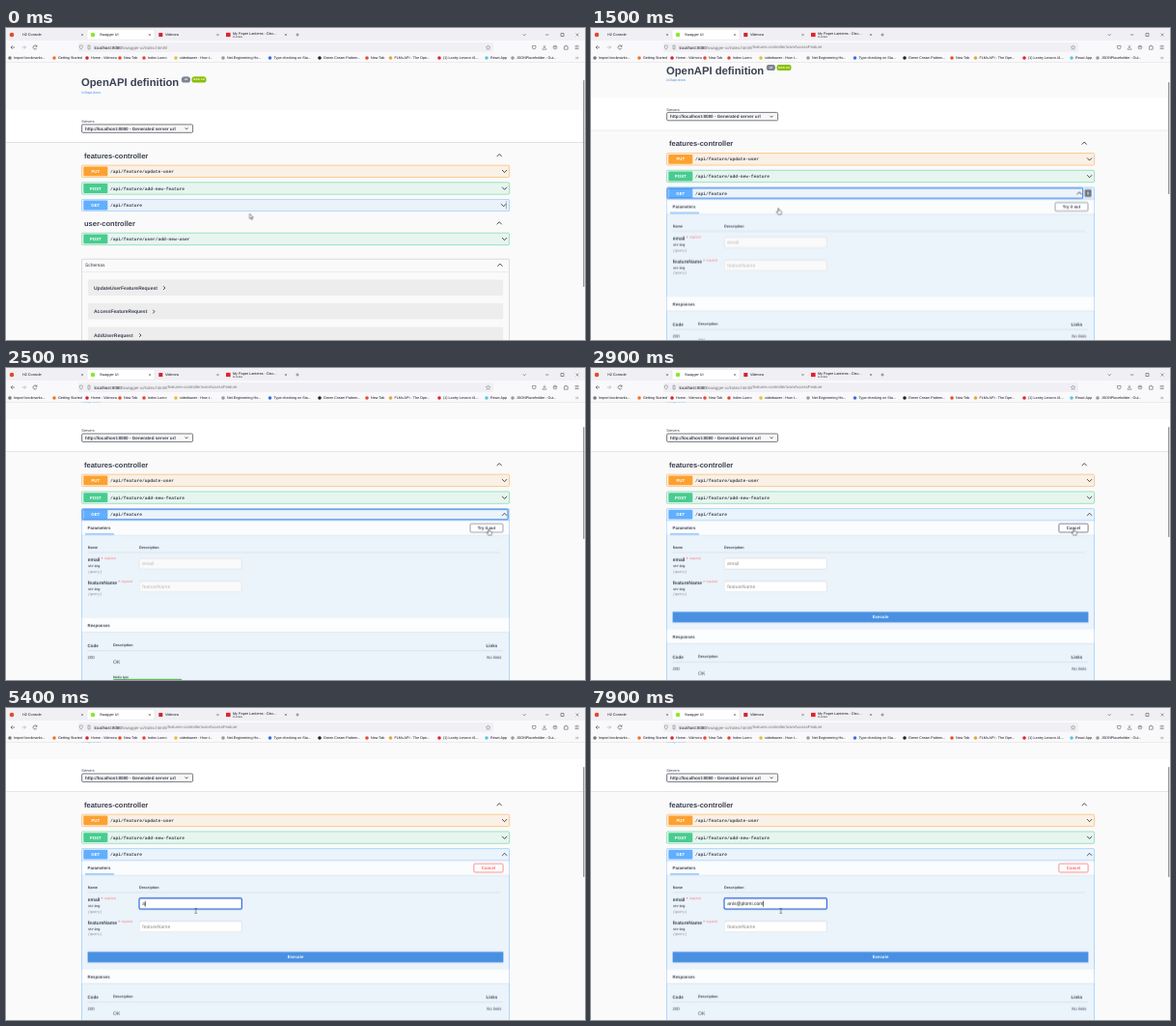
An HTML page for the animation above (8000 ms loop, 600 by 323 pixels).

```html
<!DOCTYPE html>
<html lang="en">
<head>
<meta charset="utf-8">
<title>Swagger UI</title>
<style>
html, body { margin: 0; width: 100%; height: 100%; overflow: hidden; background: #fafafa; }
svg { display: block; width: 600px; height: 323px; }
text { font-family: "Liberation Sans", Arial, sans-serif; fill: #3b4151; text-rendering: geometricPrecision; white-space: pre; }
.b { font-weight: 700; }
.i { font-style: italic; }
.m { font-family: "Liberation Mono", monospace; }
.mid { text-anchor: middle; }
.ui text { fill: #15141a; }

/* One 8 s clock for everything; on/off states switch in steps. */
.a { animation: 8s linear infinite both; }
.s { animation: 8s step-end infinite both; }
.page { animation-name: scroll; }
.thumb { animation-name: thumb; }
.url { animation-name: url; }
.open { animation-name: open; }
.shut { animation-name: shut; }
.edit { animation-name: edit; }
.view { animation-name: view; }
.drop { animation-name: drop; }
.ring { animation-name: ring; }
.ringbox { animation-name: ringbox; }
.slide { animation-name: slide; }
.copy { animation-name: copy; }
.focus { animation-name: focus; }
.blur { animation-name: blur; }
.cancel { animation-name: cancel; }
.cancelbox { animation-name: cancelbox; }
.type { animation-name: type; }
.caret { animation-name: caret; }
.move { animation-name: move; }
.arrow { animation-name: arrow; }
.hand { animation-name: hand; }
.beam { animation-name: beam; }

@keyframes scroll {
  0%, 17.25% { transform: translateY(0); }
  18.75% { transform: translateY(-12.4px); }
  21.25%, 100% { transform: translateY(-31.9px); }
}
@keyframes thumb {
  0%, 13.5% { y: 54px; height: 214px; }
  13.6%, 17.25% { y: 54px; height: 116px; }
  18.75% { y: 56px; height: 116px; }
  21.25%, 34.7% { y: 61px; height: 116px; }
  34.8%, 100% { y: 61px; height: 114px; }
}
@keyframes url { 0% { opacity: 0; } 12.2%, 100% { opacity: 1; } }
@keyframes open { 0% { opacity: 0; } 13.6%, 100% { opacity: 1; } }
@keyframes shut { 0% { opacity: 1; } 13.6%, 100% { opacity: 0; } }
@keyframes edit { 0% { opacity: 0; } 34.75%, 100% { opacity: 1; } }
@keyframes view { 0% { opacity: 1; } 34.75%, 100% { opacity: 0; } }
@keyframes drop { 0% { transform: none; } 34.75%, 100% { transform: translateY(11.8px); } }
@keyframes ring { 0% { opacity: 0; } 12.2% { opacity: 1; } 34.75%, 100% { opacity: 0; } }
@keyframes ringbox {
  0%, 20% { width: 430.6px; }
  21.25% { width: 435.8px; }
  22.5%, 100% { width: 441px; }
}
@keyframes slide {
  0% { transform: translateX(-1px); }
  1.25%, 6.5% { transform: translateX(0); }
  10%, 20% { transform: translateX(-10.5px); }
  21.25% { transform: translateX(-5.25px); }
  22.5%, 100% { transform: translateX(0); }
}
@keyframes copy {
  0% { transform: scaleX(.1); }
  1.25%, 6.5% { transform: scaleX(0); }
  10%, 20% { transform: scaleX(1); }
  21.25% { transform: scaleX(.5); }
  22.5%, 100% { transform: scaleX(0); }
}
@keyframes focus { 0% { opacity: 0; } 51%, 100% { opacity: 1; } }
@keyframes blur { 0% { opacity: 1; } 51%, 100% { opacity: 0; } }
@keyframes cancel { 0%, 36.5% { fill: #3b4151; } 39%, 100% { fill: #ff6060; } }
@keyframes cancelbox { 0%, 36.5% { stroke: #4a4f5c; } 39%, 100% { stroke: #ff6060; } }
@keyframes type {
  0% { transform: translateX(0); }
  61% { transform: translateX(2.78px); }
  64.75% { transform: translateX(0); }
  67.25% { transform: translateX(2.78px); }
  68.5% { transform: translateX(5.56px); }
  70% { transform: translateX(6.67px); }
  72.25% { transform: translateX(9.17px); }
  77.25% { transform: translateX(14.25px); }
  82.25% { transform: translateX(17.03px); }
  83.5% { transform: translateX(18.14px); }
  84.75% { transform: translateX(20.92px); }
  86% { transform: translateX(25.08px); }
  87.25% { transform: translateX(26.2px); }
  93.5% { transform: translateX(27.58px); }
  95% { transform: translateX(30.08px); }
  96.75% { transform: translateX(32.86px); }
  98.5%, 100% { transform: translateX(37.03px); }
}
@keyframes caret {
  0% { opacity: 1; }
  57.25% { opacity: 0; }
  61% { opacity: 1; }
  91% { opacity: 0; }
  93.5%, 100% { opacity: 1; }
}
@keyframes move {
  0% { transform: translate(252.5px, 192.3px); animation-timing-function: ease-in-out; }
  10%, 19.5% { transform: translate(194.3px, 186.5px); animation-timing-function: ease-in; }
  21.25% { transform: translate(319px, 170.8px); animation-timing-function: ease-out; }
  28.75%, 45% { transform: translate(500.3px, 166.5px); }
  47.5% { transform: translate(330px, 240px); }
  50% { transform: translate(205px, 218px); }
  51.25%, 100% { transform: translate(196.7px, 210px); }
}
@keyframes arrow { 0% { opacity: 1; } 6.5% { opacity: 0; } 19.6% { opacity: 1; } 27.5% { opacity: 0; } 45.5% { opacity: 1; } 50.5%, 100% { opacity: 0; } }
@keyframes hand { 0% { opacity: 0; } 6.5% { opacity: 1; } 19.6% { opacity: 0; } 27.5% { opacity: 1; } 45.5%, 100% { opacity: 0; } }
@keyframes beam { 0% { opacity: 0; } 50.5%, 100% { opacity: 1; } }
</style>
</head>
<body>
<script>
{
const put = '#fca130', post = '#49cc90', get = '#61affe';

// cy is the middle of the capitals
const text = (x, cy, size, str, cls = '', attrs = '') =>
  `<text x="${x}" y="${cy + size * .35}" font-size="${size}" class="${cls}" ${attrs}>${str}</text>`;
const rect = (x, y, w, h, fill, attrs = '') =>
  `<rect x="${x}" y="${y}" width="${w}" height="${h}" fill="${fill}" ${attrs}/>`;
const dot = (x, y, r, fill) => `<circle cx="${x}" cy="${y}" r="${r}" fill="${fill}"/>`;
const line = (d, stroke = '#333', width = .6) =>
  `<path d="${d}" fill="none" stroke="${stroke}" stroke-width="${width}"/>`;
const group = (cls, body, attrs = '') => `<g class="${cls}" ${attrs}>${body}</g>`;
const chevron = (x, y, dir = 1) => line(`M${x - 2.5} ${y - 1.3 * dir}l2.5 ${2.6 * dir}l2.5 ${-2.6 * dir}`, '#222', .8);
const cross = (x, y, r = 1.1) => line(`M${x - r} ${y - r}l${2 * r} ${2 * r}m0 ${-2 * r}l${-2 * r} ${2 * r}`, '#444', .45);

const panel = (y, h, color) => rect(78.4, y, 443.2, h, color, `fill-opacity=".1" stroke="${color}" stroke-width=".5" rx="1.25"`);
const label = (cy, color, method, path) =>
  rect(80.3, cy - 4.9, 25, 9.8, color, 'rx="1"') +
  text(92.8, cy, 4.375, method, 'b mid', 'style="fill:#fff"') +
  text(108, cy, 4.58, path, 'b m');
const row = (cy, color, method, path) =>
  panel(cy - 6.2, 12.4, color) + label(cy, color, method, path) + chevron(516.6, cy);
const tag = (cy, name) => text(81, cy, 7.5, name, 'b') + chevron(511.2, cy - .2, -1);
const schema = (cy, name, end) =>
  rect(84.8, cy - 8.3, 430.4, 16.6, '#000', 'fill-opacity=".05" rx="1"') +
  text(91, cy, 5, name, 'b') + line(`M${end} ${cy - 1.5}l1.6 1.8l-1.6 1.8`, '#222', .8);

const header = () =>
  text(78, 56.2, 11.25, 'OpenAPI definition', 'b') +
  rect(181.8, 50.2, 9.2, 6.4, '#7d8492', 'rx="3.2"') + text(186.4, 53.4, 3.1, 'v0', 'b mid', 'style="fill:#fff"') +
  rect(192.4, 50.2, 15.2, 6.4, '#89bf04', 'rx="3.2"') + text(200, 53.4, 3.1, 'OAS 3.0', 'b mid', 'style="fill:#fff"') +
  text(78, 66.2, 3.75, '/v3/api-docs', '', 'style="fill:#4990e2"') +
  rect(0, 118, 600, .8, '#000', 'fill-opacity=".12"') + rect(0, 85, 600, 33, '#fff') +
  text(78.3, 97, 3.9, 'Servers') +
  rect(78.6, 99.9, 115, 8.4, '#f7f7f7', 'stroke="#41444e" stroke-width=".7" rx="1.2"') +
  text(82, 104.1, 4.6, 'http://localhost:8080 - Generated server url', 'b') +
  line('M185.6 103.4l1.5 1.5l1.5 -1.5', '#222', .7) +
  tag(132, 'features-controller') +
  row(148.3, put, 'PUT', '/api/feature/update-user') +
  row(166, post, 'POST', '/api/feature/add-new-feature');

const below = () =>
  tag(202.2, 'user-controller') +
  row(218.4, post, 'POST', '/api/feature/user/add-new-user') +
  rect(78.4, 239.2, 443.2, 140, 'none', 'stroke="#3b4151" stroke-opacity=".35" stroke-width=".5" rx="1.25"') +
  line('M78.4 252.6H521.6', '#d0d2d6', .4) +
  text(82, 245.6, 4.9, 'Schemas') + chevron(512, 245.4, -1) +
  schema(268.8, 'UpdateUserFeatureRequest', 163.2) +
  schema(293.3, 'AccessFeatureRequest', 152.3) +
  schema(317.8, 'AddUserRequest', 138.3);

const param = (y, name, star) =>
  text(84.7, y, 5, name, 'b') +
  text(star, y - .3, 4.4, '*', '', 'style="fill:#f33"') +
  text(star + 3.3, y - 1.2, 3.1, 'required', '', 'style="fill:#ff6666"') +
  text(84.9, y + 6.3, 3.47, 'string', 'b m') +
  text(84.9, y + 12.2, 3.47, '(query)', 'i m', 'style="fill:#777"');
const field = y =>
  rect(138.2, y, 106, 10.9, '#fafafa', 'stroke="#d4d6d9" stroke-width=".4" rx="1.2"') +
  group('s edit', rect(138.2, y, 106, 10.9, '#fff', 'stroke="#d0d2d6" stroke-width=".4" rx="1.2"'));
const hint = (y, str) =>
  group('s view', text(141.3, y, 5, str, '', 'style="fill:#bbb"')) +
  group('s edit', text(141.3, y, 5, str, '', 'style="fill:#888"'));
const button = (x, w, attrs) => rect(x, 161.2, w, 8.8, '#fff', `fill-opacity=".5" stroke-width=".7" rx="1.2" ${attrs}`);
const band = y => rect(78.7, y + 14.6, 442.6, .5, '#000', 'fill-opacity=".1"') + rect(78.7, y, 442.6, 14.6, '#fff', 'fill-opacity=".8"');

// A white cover with the caret on its edge moves right and uncovers the address.
const email = () =>
  group('s focus',
    rect(138, 196.9, 106.4, 11.2, '#fff', 'stroke="#2563d8" stroke-width="1.1" rx="1.3"') +
    text(141.3, 202.6, 5, 'anis@plomi.com', '', 'style="fill:#222"') +
    group('s type', rect(141.3, 198.2, 42, 8.6, '#fff') + rect(141.4, 199.8, .6, 5.8, '#000', 'class="s caret"')));

const responses = () =>
  band(258.6) + text(84.5, 266.2, 4.375, 'Responses', 'b') +
  text(84.5, 287, 4.5, 'Code', 'b') + text(111, 286.8, 3.75, 'Description', 'b') + text(497.5, 287, 4.5, 'Links', 'b') +
  line('M84.5 292.6H515', '#c3cad3', .4) +
  text(84.5, 299.6, 4.375, '200') + text(498, 299.6, 4.375, 'No links', 'i') +
  text(111, 304.6, 5, 'OK') + text(111, 319.8, 3.1, 'Media type', 'b') +
  rect(111.2, 322.4, 71, 9, '#fff', 'stroke="#0a9a0a" stroke-width=".8" rx="1"');

const details = () =>
  rect(78.4, 145.5, 443.2, 260, '#fafafa') + panel(145.5, 260, get) +
  line('M78.4 157.9H521.6', get, .5) + band(158.2) +
  text(84.6, 165.6, 4.375, 'Parameters', 'b') + rect(82, 171.4, 30, 1.1, get) +
  group('s view', button(481, 34, 'stroke="#777b84"') + text(498, 165.6, 4.375, 'Try it out', 'b mid')) +
  group('s edit',
    button(484.9, 30.2, 'class="a cancelbox"') + text(500, 165.6, 4.375, 'Cancel', 'b mid a cancel') +
    rect(84.6, 252.4, 430.8, 11, '#4990e2') + text(300, 257.9, 4.375, 'Execute', 'b mid', 'style="fill:#fff"')) +
  text(84.7, 185.6, 3.75, 'Name', 'b') + text(138, 185.6, 3.75, 'Description', 'b') +
  line('M84.5 191H512', '#c3cad3', .4) +
  param(198.2, 'email', 98.8) + param(222, 'featureName', 116.2) +
  field(197.1) + group('s blur', hint(202.6, 'email')) + email() +
  field(220.9) + hint(226.4, 'featureName') +
  group('s drop', responses());

const getRow = () =>
  group('s shut', panel(177.3, 12.4, get)) +
  label(183.5, get, 'GET', '/api/feature') +
  group('a slide', group('s shut', chevron(516.6, 183.5)) + group('s open', chevron(516.6, 183.5, -1))) +
  group('a copy', rect(511.5, 179.6, 7.2, 7.9, '#7d8492', 'rx="1"') +
    rect(513.4, 181.3, 3.4, 4.5, '#aeb3bc', 'stroke="#444a56" stroke-width=".5"'), 'style="transform-origin:518.7px 183.5px"') +
  group('s ring', rect(79.1, 178.2, 430.6, 10.6, 'none', 'stroke="#1f6fe0" stroke-width=".9" rx=".8" class="a ringbox"'));

const bookmarks = [
  [8, 'Import bookmarks...', '#777'], [54, 'Getting Started', '#f0702c'], [88, 'Home - Vidmora', '#d5222c'],
  [122, 'New Tab', '#e84a2a'], [147, 'Index Lurno', '#e2452e'], [180, 'sidedrawer - How t...', '#e0bf3a'],
  [229, 'Net Engineering Ho...', '#999'], [277.5, 'Type checking on Sta...', '#3a6fd8'], [329, 'Green Cream Pattern...', '#222'],
  [378, 'New Tab', '#e84a2a'], [402.5, 'FLMs API - The Ope...', '#e3a53a'], [453, '(1) Lantry Lesson #1...', '#e0242c'],
  [502, 'React App', '#5cc4e0'], [529, 'JSONPlaceholder - Gui...', '#999']
];

const browser = () =>
  rect(0, 0, 600, 13.2, '#f0f0f4') + rect(0, 13.2, 600, 22, '#f9f9fb') + rect(0, 35, 600, .4, '#d5d5da') +
  rect(84, 1.4, 70, 10.8, '#fff', 'stroke="#d8d8de" stroke-width=".4" rx="1.3"') +
  dot(6, 7, 2.3, '#e5492c') + text(17, 7, 3.75, 'H2 Console') + cross(79, 7) +
  dot(90, 7, 2.3, '#85ea2d') + text(97, 7, 3.75, 'Swagger UI') + cross(149, 7) +
  rect(158.3, 5, 4, 4, '#d5222c') + text(165, 7, 3.75, 'Vidmora') + cross(219.5, 7) +
  rect(228, 4.9, 4.6, 4.2, '#e0242c') + text(235, 5.4, 3.75, 'My Paper Lanterns - Disc...') +
  text(235, 9.6, 2.4, 'PLAYING') + cross(290, 7) +
  line('M300.4 7h3.2M302 5.4v3.2M535.7 6.3l1.5 1.5l1.5 -1.5M559 7h3.4M575 5.5h3v3h-3z', '#333', .5) + cross(592, 7, 1.5) +
  line('M9 20H5m1.8 -1.8l-1.8 1.8l1.8 1.8', '#444') +
  line('M16.6 20h4m-1.8 -1.8l1.8 1.8l-1.8 1.8', '#aaa') +
  line('M31.8 19a2 2 0 1 0 .1 1.8M32 17.6v1.6h-1.6', '#444') +
  rect(75, 15.2, 430, 9.8, '#f0f0f4', 'rx="1.3"') +
  line('M76.2 18.4l1.6 -.6l1.6 .6q0 2.8 -1.6 3.8q-1.6 -1 -1.6 -3.8M85 18h2v4h-2z', '#666', .45) +
  text(91.4, 20, 4.4, 'localhost:8080<tspan fill="#777">/swagger-ui/index.html#/</tspan>') +
  group('s url', text(167.4, 20, 4.25, 'features-controller/userAccessFeature', '', 'style="fill:#777"')) +
  line('M499.6 17.9l.7 1.5l1.6 .2l-1.2 1.1l.3 1.6l-1.4 -.8l-1.4 .8l.3 -1.6l-1.2 -1.1l1.6 -.2z', '#666', .4) +
  line('M545.4 18.4h3.6v1.6a1.8 1.8 0 0 1 -3.6 0zM558 17.8v2.8m-1.3 -1.2l1.3 1.3l1.3 -1.3M556.1 21.2v1h3.8v-1', '#444', .5) +
  line('M578.4 19h1.3v-.8h1.2v.8h1.3v3.2h-3.8zM589.6 18.4h4M589.6 20h4M589.6 21.6h4', '#444', .5) +
  `<circle cx="569" cy="20" r="1.9" fill="none" stroke="#444" stroke-width=".5"/>` + dot(569, 19.6, .7, '#444') +
  bookmarks.map(([x, name, color]) => dot(x - 4, 31, 1.8, color) + text(x, 31, 3.7, name)).join('') +
  line('M590.4 29.8l1.1 1.2l-1.1 1.2m1.6 -2.4l1.1 1.2l-1.1 1.2', '#444', .4);

const cursor = () => group('a move',
  group('s arrow', `<path d="M0 0v5.2l1.2 -1.1l.9 2l.9 -.4l-.9 -1.9h1.7z" fill="#fff" stroke="#111" stroke-width=".45"/>`) +
  group('s hand', `<path d="M-.6 .4q.6 -.8 1.2 0v2l2.1 .5q.7 .3 .6 1l-.5 2.6h-3.2l-1.9 -2.4q.1 -.8 .9 -.4l.8 .6z" fill="#fff" stroke="#111" stroke-width=".45"/>`) +
  group('s beam', line('M-1.2 -2.6q1.2 0 1.2 .6q0 -.6 1.2 -.6M0 -2v4M-1.2 2.6q1.2 0 1.2 -.6q0 .6 1.2 .6', '#222', .5)));

document.body.innerHTML = `<svg viewBox="0 0 600 323">${
  rect(0, 0, 600, 323, '#fafafa') +
  group('a page',
    header() + group('s shut', below()) +
    group('s open', group('', details(), 'transform="translate(0 31.9)"')) +
    getRow()) +
  rect(598.1, 54, 1.3, 214, '#8f8f95', 'rx=".6" class="a thumb"') +
  group('ui', browser()) + cursor()
}</svg>`;
}
</script>
</body>
</html>
```
